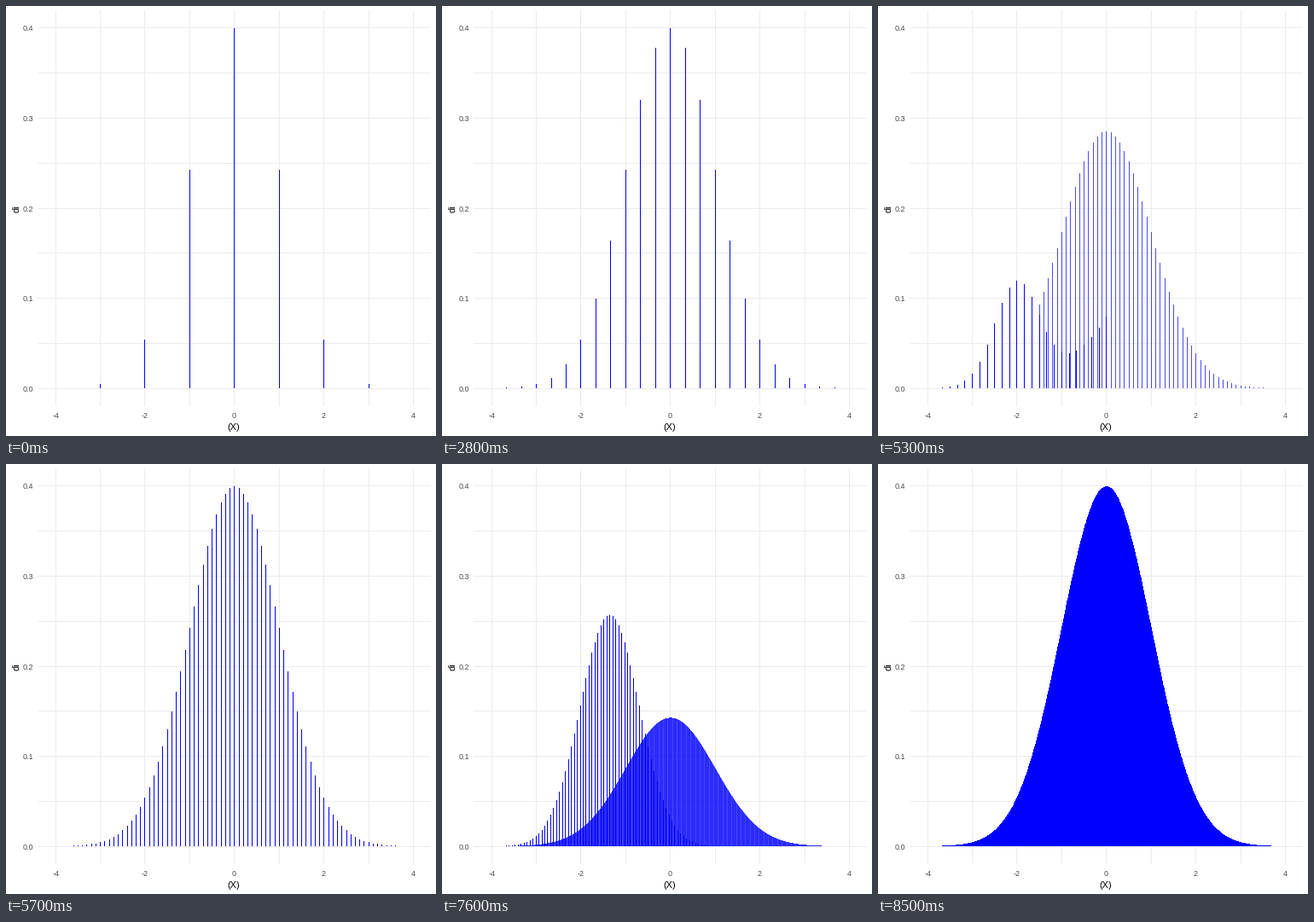
These frames come from a looping animation (504 by 504 pixels, 10000 ms). A matplotlib script:

```python
import numpy as np
import matplotlib.pyplot as plt
from matplotlib.animation import FuncAnimation
from matplotlib.collections import LineCollection

SIZE = 504
FRAMES, INTERVAL = 100, 100
STEPS = 14                      # frames per transition
STARTS = (14, 43, 71)           # last resting frame before each transition
SPACING = (1, 1 / 3, 0.1, 0.005)

X0, X_SCALE = 267.39, 52.45     # pixel of x = 0, pixels per unit
Y0, Y_SCALE = 448, 1057
LEFT, RIGHT, TOP, BOTTOM = 37, 498, 5, 469
BLUE = (0, 0, 1)

plt.rcParams["font.family"] = "Liberation Sans"


def pixel_x(x):
    return np.floor(X0 + X_SCALE * np.asarray(x) + 0.5)


def pixel_y(y):
    return Y0 - np.floor(Y_SCALE * np.asarray(y) + 0.5)


def density_bars(spacing):
    """Evenly spaced positions on [-4, 4] and the normal density there."""
    x = -4 + spacing * np.arange(round(8 / spacing) + 1)
    return x, np.exp(-x * x / 2) / np.sqrt(2 * np.pi)


STATES = [density_bars(s) for s in SPACING]


def blend(start, end, t):
    """Bars pair up by index; the surplus ones grow and fade in."""
    (xa, ya), (xb, yb) = start, end
    n = len(xa)
    x, y = xb.copy(), yb * t
    x[:n] = xa + (xb[:n] - xa) * t
    y[:n] = ya + (yb[:n] - ya) * t
    alpha = np.full(len(xb), t)
    alpha[:n] = 1
    return x, y, alpha


def bars_at(frame):
    if frame <= STARTS[0]:
        x, y = STATES[0]
        return x, y, np.ones(len(x))
    i = max(k for k, s in enumerate(STARTS) if frame > s)
    t = min((frame - STARTS[i]) / STEPS, 1)
    return blend(STATES[i], STATES[i + 1], t)


fig = plt.figure(figsize=(SIZE / 72, SIZE / 72), dpi=72, facecolor="white")
ax = fig.add_axes([0, 0, 1, 1])
ax.set_xlim(0, SIZE)
ax.set_ylim(SIZE, 0)
ax.axis("off")

grid = [[(x + 0.5, TOP), (x + 0.5, BOTTOM)] for x in pixel_x(np.arange(-4, 5))]
grid += [[(LEFT, y + 0.5), (RIGHT, y + 0.5)]
         for y in pixel_y(np.arange(9) * 0.05)]
ax.add_collection(LineCollection(grid, colors="#ebebeb", linewidths=1,
                                 capstyle="butt", snap=False), autolim=False)

bars = LineCollection([], linewidths=1, capstyle="butt", snap=False, zorder=3)
ax.add_collection(bars, autolim=False)

tick = dict(fontsize=9, color="#4d4d4d", va="baseline")
for v in range(-4, 5, 2):
    ax.text(pixel_x(v) + 0.5, 483, str(v), ha="center", **tick)
for v in range(5):
    ax.text(32, pixel_y(v / 10) + 4, f"{v / 10:.1f}", ha="right", **tick)
ax.text(267, 497, "(X)", fontsize=11, ha="center", va="baseline")
ax.text(15, 237.5, "di", fontsize=11, rotation=90, rotation_mode="anchor",
        ha="center", va="baseline")


def update(frame):
    x, y, alpha = bars_at(frame)
    px, top = pixel_x(x) + 0.5, pixel_y(y)
    shown = top < Y0
    px, top, alpha = px[shown], top[shown], alpha[shown]
    foot = np.full(len(px), Y0)
    ends = np.stack([px, foot, px, top], axis=1).reshape(-1, 2, 2)
    bars.set_segments(ends)
    bars.set_color([(*BLUE, a) for a in alpha])
    return (bars,)


anim = FuncAnimation(fig, update, frames=FRAMES, interval=INTERVAL,
                     init_func=lambda: update(0), repeat=True, repeat_delay=0)
plt.show()
```
